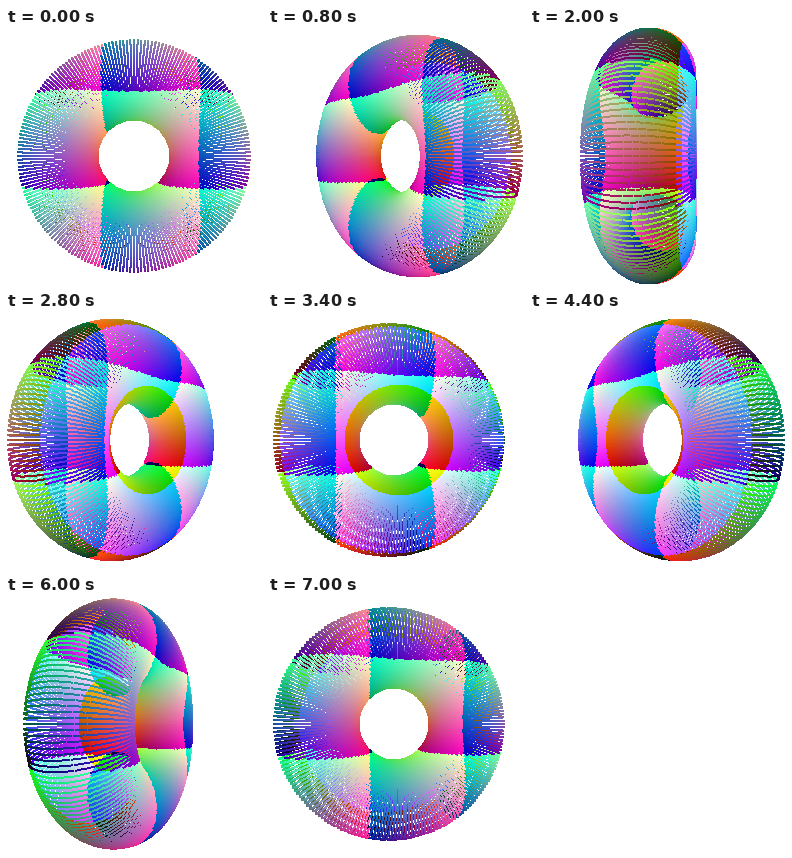
Write an HTML page with a canvas that moves like this. It is 256 px wide and 256 px high and loops after 7.2 s.

```html
<!DOCTYPE html>
<html lang="en">
<head>
<meta charset="utf-8">
<title>Dotted torus</title>
<style>
html, body { margin: 0; width: 100%; height: 100%; overflow: hidden; background: #fff; }
canvas { display: block; width: 100%; height: 100%; image-rendering: pixelated; }
</style>
</head>
<body>
<canvas id="stage" width="256" height="256"></canvas>
<script>
const SIZE = 256, LOOP = 7200, STEP = 200;
const RING = 2, TUBE = 1, SEGMENTS = 200, DOT = 2;
const CAMERA = 6, FOCAL = SIZE / 2 / Math.tan(Math.PI / 6);

const ctx = document.getElementById('stage').getContext('2d');
const image = ctx.createImageData(SIZE, SIZE);
const pixels = new Uint32Array(image.data.buffer);
const depth = new Float32Array(SIZE * SIZE);

// Each axis drives one channel as a sawtooth that wraps every 2.25 units.
function channel(p) {
  const t = (p + 3) / 2.25;
  return Math.floor((t - Math.floor(t)) * 255.99);
}

const points = [];
for (let j = 0; j < SEGMENTS; j++) {
  const v = j / SEGMENTS * 2 * Math.PI;
  const radius = RING + TUBE * Math.cos(v);
  const z = TUBE * Math.sin(v);
  for (let i = 0; i < SEGMENTS; i++) {
    const u = i / SEGMENTS * 2 * Math.PI;
    const x = radius * Math.cos(u), y = radius * Math.sin(u);
    const color = (255 << 24 | channel(z) << 16 | channel(y) << 8 | channel(x)) >>> 0;
    points.push({ x, y, z, color });
  }
}

function plot(cx, cy, dist, color) {
  const left = Math.round(cx - DOT / 2), top = Math.round(cy - DOT / 2);
  for (let y = Math.max(top, 0); y < Math.min(top + DOT, SIZE); y++) {
    for (let x = Math.max(left, 0); x < Math.min(left + DOT, SIZE); x++) {
      const k = y * SIZE + x;
      if (dist < depth[k]) {
        depth[k] = dist;
        pixels[k] = color;
      }
    }
  }
}

function draw(angle) {
  const c = Math.cos(angle), s = Math.sin(angle);
  pixels.fill(0xffffffff);
  depth.fill(Infinity);
  for (const p of points) {
    const dist = CAMERA - (p.x * s + p.z * c);
    const scale = FOCAL / dist;
    plot(SIZE / 2 + (p.x * c - p.z * s) * scale, SIZE / 2 - p.y * scale, dist, p.color);
  }
  ctx.putImageData(image, 0, 0);
}

const start = performance.now();
let shown = -1;
function tick() {
  const time = Math.max(0, performance.now() - start) % LOOP;
  const pose = Math.floor(time / STEP);
  if (pose !== shown) {
    shown = pose;
    draw(pose * STEP / LOOP * 2 * Math.PI);
  }
  requestAnimationFrame(tick);
}
tick();
</script>
</body>
</html>
```
